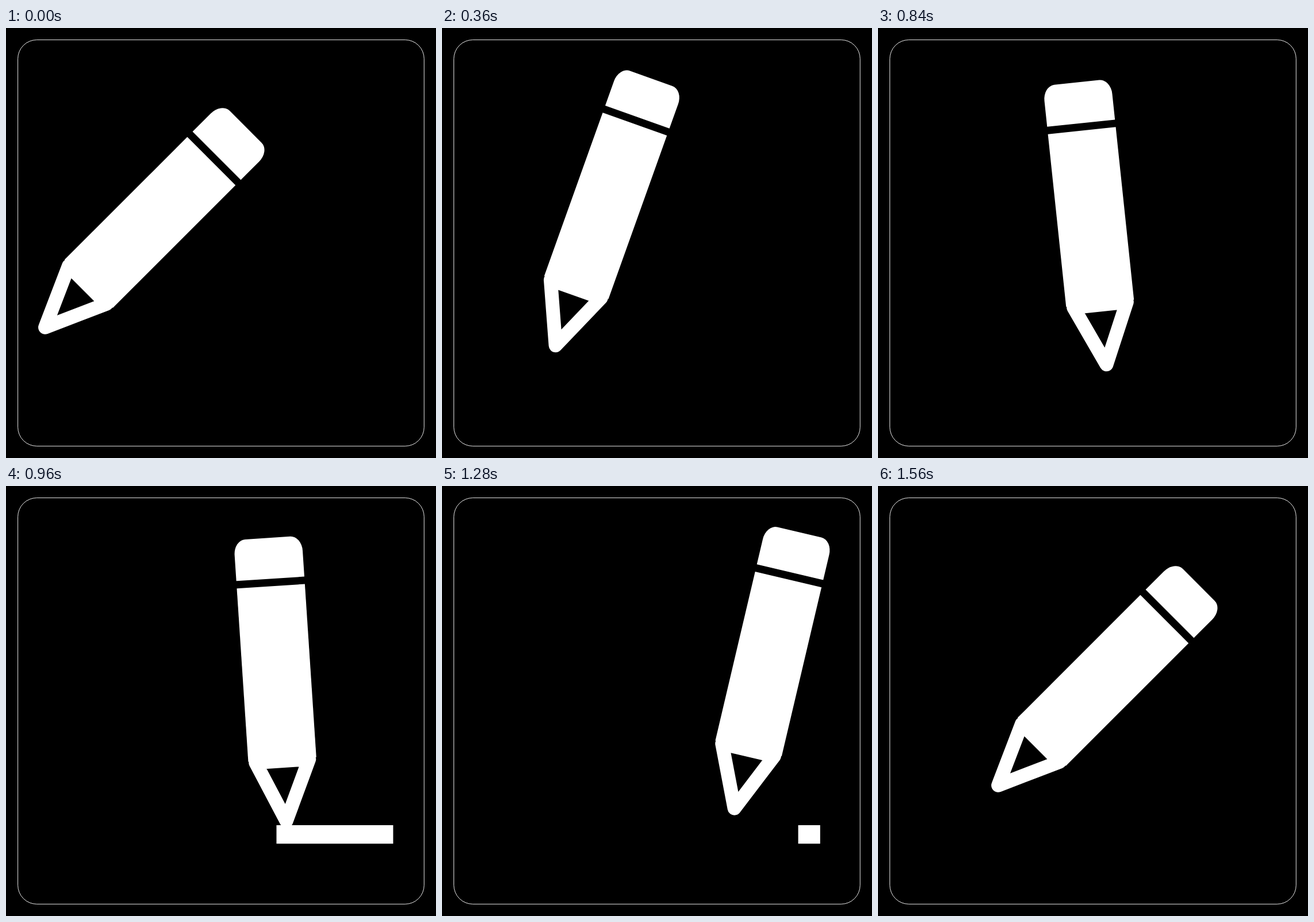
Write an HTML page that moves like this. It is 748 by 748 pixels and loops after 1.6 s.

```html
<!DOCTYPE html>
<html lang="en">
<head>
<meta charset="utf-8">
<title>Pencil</title>
<style>
  html, body { margin: 0; width: 100%; height: 100%; overflow: hidden; background: #000; }
  svg { display: block; width: 100vw; height: 100vh; }
</style>
</head>
<body>
<svg viewBox="0 0 748 748" fill="#fff">
  <rect x="20.6" y="20.6" width="706.7" height="706.7" rx="33" fill="none" stroke="#fff" stroke-opacity=".9"/>
  <rect id="line" y="590" height="32.2"/>
  <!-- Drawn upright around the middle of the body -->
  <g id="pencil">
    <path d="M-59.3-164V-209A20 26 0 0 1-39.3-235.3H39.3A20 26 0 0 1 59.3-209V-164Z"/>
    <rect x="-59.3" y="-151" width="118.6" height="302"/>
    <path d="M-46.6 153.5H46.6L0 258Z" fill="none" stroke="#fff" stroke-width="24" stroke-linejoin="round"/>
  </g>
</svg>
<script>
  const LOOP = 1600, STEP = 40;
  const PIVOT_Y = 557.8, OFFSET = "-72.5 -238";

  // Tracks of [time in ms, value], linear between keys
  const angle = [[0, 45], [640, 0], [782, -7.1], [1163, 0], [1560, 45]];
  const pivotX = [[0, 133.5], [640, 380.8], [726, 380.8], [1163, 713], [1560, 274.5]];
  const lineWidth = [[880, 266], [1146, 56.5], [1560, 0]];
  const LINE_ORIGIN = 654.2, LEFT_SHARE = 0.905;

  const line = document.getElementById("line");
  const pencil = document.getElementById("pencil");

  function valueAt(track, t) {
    const i = track.findIndex(key => key[0] > t);
    if (i < 0) return track[track.length - 1][1];
    if (i === 0) return track[0][1];
    const [t0, v0] = track[i - 1], [t1, v1] = track[i];
    return v0 + (v1 - v0) * (t - t0) / (t1 - t0);
  }

  function draw(now) {
    const t = Math.floor(now % LOOP / STEP) * STEP;
    pencil.setAttribute("transform",
      `translate(${valueAt(pivotX, t)} ${PIVOT_Y}) rotate(${valueAt(angle, t)}) translate(${OFFSET})`);

    const width = t < lineWidth[0][0] ? 0 : valueAt(lineWidth, t);
    line.setAttribute("x", LINE_ORIGIN - LEFT_SHARE * width);
    line.setAttribute("width", width);
  }

  const start = performance.now();
  function tick() {
    draw(performance.now() - start);
    requestAnimationFrame(tick);
  }
  tick();
</script>
</body>
</html>
```
